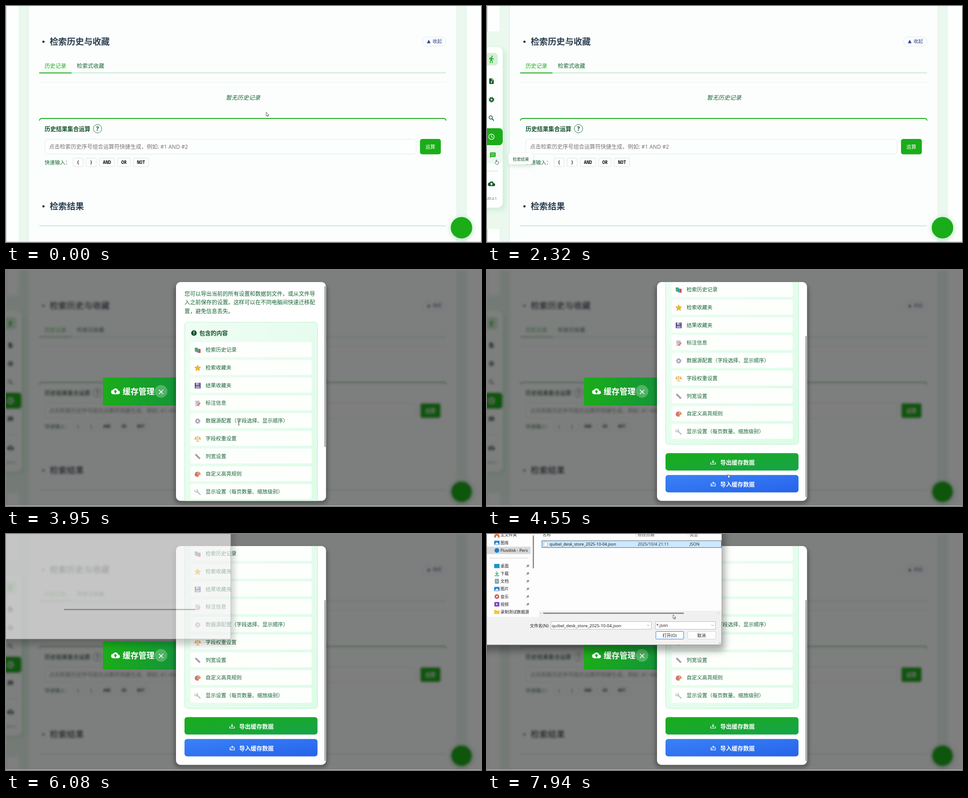
An HTML page for the animation above (8 s loop, 1059 by 529 pixels).

```html
<!DOCTYPE html>
<html lang="zh-CN">
<head>
<meta charset="utf-8">
<title>缓存管理</title>
<style>
html, body { margin: 0; width: 100%; height: 100%; overflow: hidden; background: #fff; }
svg { display: block; width: 100vw; height: 100vh; }
text { font-family: "Noto Sans", "Noto Sans CJK SC", "Noto Sans CJK", sans-serif; white-space: pre; }
.mono { font-family: "Noto Sans Mono", "DejaVu Sans Mono", monospace; }
</style>
</head>
<body>
<svg id="stage" viewBox="0 0 1059 529" preserveAspectRatio="none"></svg>
<script>
const LOOP = 8000, STEP = 120;
const GREEN = '#1aad19', DARK = '#14532d', LEAF = '#166534';

// Markup helpers; text is placed by the middle of its line
const text = (x, mid, str, size, fill, extra = '') =>
  `<text x="${x}" y="${mid + size * 0.375}" font-size="${size}" fill="${fill}" ${extra}>${str}</text>`;
const rect = (x, y, w, h, fill, rx = 0, extra = '') =>
  `<rect x="${x}" y="${y}" width="${w}" height="${h}" fill="${fill}" rx="${rx}" ${extra}/>`;
const path = (d, extra) => `<path d="${d}" ${extra}/>`;
const circle = (x, y, r, fill, extra = '') => `<circle cx="${x}" cy="${y}" r="${r}" fill="${fill}" ${extra}/>`;
const hline = (x1, x2, y, color, w = 1) => path(`M${x1} ${y}H${x2}`, `stroke="${color}" stroke-width="${w}"`);
const BOLD = 'font-weight="700"';
const MID = 'text-anchor="middle"';

// Line icons on a 24 unit grid, drawn in the current colour
const solid = d => path(d, 'fill="currentColor" fill-rule="evenodd"');
const stroked = (d, w = 2) => path(d, `fill="none" stroke="currentColor" stroke-width="${w}"`);
const ring = (x, y, r, w, extra = '') =>
  circle(x, y, r, 'none', `stroke="currentColor" stroke-width="${w}" ${extra}`);
const ICONS = {
  walk: circle(13.5, 3.5, 2, 'currentColor') +
    solid('M9.8 8.9 7 23h2.1l1.8-8 2.1 2v6h2v-7.5l-2.1-2 .6-3C14.8 12 16.8 13 19 13v-2c-1.9 0-3.5-1-4.3-2.4l-1-1.6c-.4-.6-1-1-1.7-1l-.8.1L6 8.3V13h2V9.6z'),
  file: solid('M14 2H6a2 2 0 0 0-2 2v16a2 2 0 0 0 2 2h12a2 2 0 0 0 2-2V8zM13 3.5 18.5 9H13zM12 11l4 4h-3v4h-2v-4H8z'),
  gear: ring(12, 12, 5.4, 4.2) + ring(12, 12, 8.4, 3.2, 'stroke-dasharray="3.6 3"'),
  search: ring(9.5, 9.5, 5.5, 2.2) + stroked('M13.7 13.7 20 20', 2.8),
  clock: ring(12, 12, 9, 2) + stroked('M12 6.5V12l4.5 2.8'),
  chat: solid('M4 2h16a2 2 0 0 1 2 2v12a2 2 0 0 1-2 2H6l-4 4V4a2 2 0 0 1 2-2zM6 6h3v2.5H6zM10.5 6h3v2.5h-3zM15 6h3v2.5h-3zM6 11h3v2.5H6zM10.5 11h3v2.5h-3zM15 11h3v2.5h-3z'),
  cloud: solid('M19.35 10A7.5 7.5 0 0 0 12 4C9.1 4 6.6 5.6 5.35 8A6 6 0 0 0 0 14a6 6 0 0 0 6 6h13a5 5 0 0 0 .35-10zM14 13v4h-4v-4H7l5-5 5 5z'),
  save: stroked('M3 13v7h18v-7M12 3v11M7.5 10l4.5 4.5 4.5-4.5', 2.2),
  load: stroked('M8 11H4v9h17v-9h-4M8 20v-6M9 9l4-4 4 4M13 5v9', 2.2)
};
const icon = (name, x, y, size, color, extra = '') =>
  `<g ${extra} color="${color}"><g transform="translate(${x - size / 2} ${y - size / 2}) scale(${size / 24})">${ICONS[name]}</g></g>`;

// Small coloured pictures on a 16 unit grid
const PICTURES = [
  rect(1, 2, 7, 10, '#4caf50', 1, 'transform="rotate(-6 4 7)"') + rect(6, 4, 4, 10, '#2f9fe0', 1) + rect(10, 5, 5, 10, '#e0475b', 1),
  path('M8 .8 10.2 5.6 15.4 6.2 11.5 9.7 12.6 15 8 12.3 3.4 15 4.5 9.7.6 6.2 5.8 5.6z', 'fill="#f4b721" stroke="#d99a17" stroke-width=".8"'),
  rect(1, 1, 14, 14, '#493a78', 1) + rect(4, 1, 8, 6, '#d7d4e6') + rect(3, 9, 10, 6, '#a9a2cf') + rect(8.5, 2, 2, 4, '#493a78'),
  rect(2, 1, 11, 14, '#cfd3de', 1) + hline(4, 11, 4.5, '#9299aa') + hline(4, 11, 7, '#9299aa') + path('M6 13 13 6l2 2-7 7z', 'fill="#ef6b4a"'),
  `<g color="#a8a3bb" transform="scale(.667)">${ICONS.gear}</g>`,
  path('M8 1v12M4 14h8M2 4h12M3 4 .8 9h4.6zM13 4l-2.4 5h4.6z', 'fill="#fbe3b0" stroke="#e6a64a" stroke-width="1.3"'),
  path('M1 4 4 1 15 12 12 15z', 'fill="#aaa2b8"') + path('M5 3.5 3.8 4.7M7.4 6 6.2 7.2M9.8 8.4 8.6 9.6M12 10.6 10.8 11.8', 'stroke="#716a80"'),
  path('M8 1.5c5 0 7.5 3 7 6.5-.4 2.5-3 1-4 2.5s.5 4-3 4C3.500 14.500.5 12 .7 8S4 1.500 8 1.500z', 'fill="#e58b72"') +
    circle(5, 5, 1.5, '#3e8ed0') + circle(10, 4.6, 1.5, '#f6d04d') + circle(4, 9.5, 1.5, '#b13c65') + circle(7.5, 12, 1.3, '#4caf50'),
  path('M14 14 6 6', 'stroke="#b5bdc9" stroke-width="2.6" stroke-linecap="round"') +
    path('M3 1.500v3h3', 'fill="none"') + path('M1.500 3A3.4 3.4 0 1 0 5 1.500', 'fill="none" stroke="#b5bdc9" stroke-width="2"')
];
const ROWS = ['检索历史记录', '检索收藏夹', '结果收藏夹', '标注信息', '数据源配置（字段选择、显示顺序）',
  '字段权重设置', '列宽设置', '自定义高亮规则', '显示设置（每页数量、缩放级别）'];

const defs = () => {
  const grad = (id, a, b, box = '') =>
    `<linearGradient id="${id}" x1="0" y1="0" x2="1" y2="1" ${box}><stop stop-color="${a}"/><stop offset="1" stop-color="${b}"/></linearGradient>`;
  const blur = (id, s) =>
    `<filter id="${id}" x="-50%" y="-50%" width="200%" height="200%"><feGaussianBlur stdDeviation="${s}"/></filter>`;
  return `<defs>${grad('mint', '#f0fdf4', '#dcfce7')}${grad('export', GREEN, '#16a34a')}${grad('import', '#3b82f6', '#2563eb')}
    <linearGradient id="head"><stop stop-color="${GREEN}"/><stop offset="1" stop-color="#14933b"/></linearGradient>
    ${blur('soft', 5)}${blur('wide', 8)}
    <filter id="haze" filterUnits="userSpaceOnUse" x="0" y="0" width="1059" height="529"><feGaussianBlur stdDeviation="2.6"/></filter>
    <clipPath id="sheet">${rect(379, 27, 334.5, 490.5, '#000', 10)}</clipPath>
    <clipPath id="nav">${rect(0, 0, 97, 200, '#000')}</clipPath></defs>`;
};

const page = () => {
  const title = (y, str) => circle(83.5, y, 2.6, '#2c3e50') + text(97.5, y, str, 19.1, '#2c3e50', BOLD);
  const key = (x, w, str) => rect(x + .5, 341, w, 19, '#fefefe', 3, 'stroke="#d6e2dc"') +
    text(x + .5 + w / 2, 350.4, str, 10, '#111', `${BOLD} ${MID} class="mono"`);
  return rect(0, 0, 1059, 529, '#fdfffe') +
    rect(28, 0, 22, 529, '#eaf8ef') + rect(1005, 0, 23, 529, '#eaf8ef') +
    rect(50, 0, 955, 529, '#fcfefd') + rect(49.5, 0, 1, 529, '#d5ebdd') + rect(1004.5, 0, 1, 529, '#dff0e5') +
    title(80, '检索历史与收藏') + title(449, '检索结果') +
    rect(928.5, 69.5, 52.5, 20.5, '#fbfdff', 10.2, 'stroke="#dde6ec"') +
    path('M938.500 83.500h8l-4-8z', 'fill="#2f4586"') + text(951, 79.5, '收起', 10.5, '#2f4586') +
    text(86, 134, '历史记录', 12.1, GREEN) + text(158, 134, '检索式收藏', 12.2, LEAF) +
    hline(74, 981, 150, '#b0e6c3', 1.6) + hline(74, 146, 150, GREEN, 2) + hline(74, 981, 171, '#deeee7') +
    `<g id="none">${text(490, 204.7, '暂无历史记录', 12.8, LEAF, 'font-style="italic"')}</g>` +
    path('M74.500 257Q75 252 81 252H975Q980.500 252 981 257', `fill="none" stroke="${GREEN}" stroke-width="1.8"`) +
    text(86, 275.7, '历史结果集合运算', 12.75, DARK, BOLD) +
    circle(204, 275, 9.4, '#fdfffe', `stroke="${DARK}" stroke-width=".9"`) + text(204, 275, '?', 13.5, DARK, `${BOLD} ${MID}`) +
    rect(86.5, 298.5, 828, 33.5, '#fdfefe', 6, 'stroke="#d3efe0"') +
    text(96, 315.5, '点击检索历史序号组合运算符快捷生成，例如: #1 AND #2', 12.1, '#757575') +
    rect(923, 298, 46.5, 34.5, GREEN, 5) + text(946, 315.5, '运算', 11, '#fff', MID) +
    text(86, 350.5, '快速输入：', 11.5, LEAF) +
    key(149, 22.5, '(') + key(178, 22.5, ')') + key(207.5, 34, 'AND') + key(248.5, 28, 'OR') + key(283.5, 34, 'NOT') +
    hline(74, 981, 492.7, '#a9ebc3', 1.6) +
    circle(1016, 499, 27, '#bfe3c4', 'filter="url(#soft)" opacity=".7"') + circle(1015.5, 497, 24, GREEN) +
    rect(0, 0, 1, 529, '#b4b8b6');
};

const sidebar = () => `<g id="side">` +
  rect(-20, 57, 66, 443, '#eaf8ee', 14) +
  rect(-20, 96, 62, 362, '#c9ead0', 12, 'filter="url(#soft)" opacity=".7"') +
  rect(-20, 92, 55, 360, '#fcfffd', 12) +
  rect(-10, 105, 34, 28.5, '#d3f0d6', 8) + icon('walk', 10, 119.5, 19, GREEN) +
  rect(-10, 274, 45, 38, GREEN, 8) +
  rect(-10, 316, 45, 37, '#ebf9ee', 8, 'id="hover"') +
  icon('file', 10, 168.5, 15, DARK) + icon('gear', 10, 210, 15, DARK) + icon('search', 10, 251.5, 16, DARK) +
  icon('clock', 10, 293, 16, '#fff') + icon('chat', 10, 334.5, 15, DARK, 'id="chat"') +
  icon('cloud', 10, 398.5, 16, DARK, 'id="cloud"') +
  hline(0, 25, 370, '#c3dccb') + text(.5, 431.5, '25.2.1', 7.6, LEAF) + `</g>`;

const tooltip = () => `<g id="tip">${rect(49, 334, 53, 25, '#9fc5aa', 5, 'filter="url(#soft)" opacity=".45"')}
  ${rect(48, 330, 54, 25, '#fdfffe', 5)}<text id="tipText" x="57.500" y="346.500" font-size="9" fill="${DARK}"></text></g>`;

const header = () => `<g id="header">${rect(216, 241, 180, 63, 'url(#head)', 0, 'id="headBar"')}
  ${icon('cloud', 244, 272, 19.5, '#fff')}${text(260, 272.8, '缓存管理', 17.8, '#fff', BOLD)}
  ${circle(345.5, 272, 14.3, '#fff', 'opacity=".25"')}${path('M341 268.500l9.500 9.500M350.500 268.500l-9.500 9.500', 'stroke="#fff" stroke-width="1.700"')}</g>`;

const modal = () => {
  const intro = ['您可以导出当前的所有设置和数据到文件，或从文件导', '入之前保存的设置。这样可以在不同电脑间快速迁移配', '置，避免信息丢失。'];
  const row = (str, i) => {
    const y = 161.8 + i * 39.75;
    return rect(411.5, y, 270, 33.5, '#fdfffd', 4) +
      `<g transform="translate(420 ${y + 10.5}) scale(.92)">${PICTURES[i]}</g>` + text(445, y + 17, str, 11.5, LEAF);
  };
  const button = (y, fill, name, str) => rect(398, y, 296.5, 39, fill, 6) +
    icon(name, 504, y + 20, 14, '#fff') + text(520, y + 20.3, str, 12.8, '#fff', BOLD);
  return `<g id="modal">
    ${rect(375, 32, 342, 492, '#000', 12, 'id="shade" filter="url(#soft)" opacity=".3"')}
    ${rect(379, 27, 334.5, 490.5, '#fefffe', 10, 'id="sheetBg"')}
    <g clip-path="url(#sheet)" id="body"><g id="scroll">
      ${intro.map((s, i) => text(398, 53.3 + i * 19.4, s, 12.13, LEAF)).join('')}
      ${rect(398.5, 117, 296, 409, 'url(#mint)', 6, 'stroke="#bbf0cd"')}
      ${circle(419, 141.3, 6.2, DARK)}${rect(418.3, 137.5, 1.5, 4.6, '#fff')}${rect(418.3, 143.3, 1.5, 1.5, '#fff')}
      ${text(431, 141.5, '包含的内容', 12.7, DARK, BOLD)}
      ${ROWS.map(row).join('')}
      ${button(545.5, 'url(#export)', 'save', '导出缓存数据')}
      ${button(594.5, 'url(#import)', 'load', '导入缓存数据')}
    </g>${rect(710.3, 36, 2, 361, '#7f8281', 1, 'id="thumb"')}</g></g>`;
};

const dialog = () => {
  const INK = '#1c1c1c', NAME = 'quibel_desk_store_2025-10-04.json';
  const places = [['主文件夹', 2, '#d9763f'], ['图库', 19.5, '#2886d8'], ['Fluvdisk - Pers', 36.8, '#1a7fd4'],
    ['桌面', 71.5, '#1a95c9'], ['下载', 88.5, '#22a06b'], ['文档', 105.7, '#7d94ad'], ['图片', 123, '#2886d8'],
    ['音乐', 140.2, '#d2604f'], ['视频', 157.5, '#7b3fc9'], ['录制测试数据源', 174.7, '#f5c443']];
  const glyph = (i, y, c) => {
    if (i === 0) return path(`M16 ${y + 1}l6-5 6 5v5h-4v-4h-4v4h-4z`, `fill="${c}"`);
    if (i === 2 || i === 8 - 1) return circle(22, y, 5.3, c) + (i === 7 ? circle(22, y, 2, '#fff') : '');
    if (i === 4) return path(`M22 ${y - 5}v7M18.500 ${y - 1}l3.500 3.500 3.500-3.500M17 ${y + 5}h10`, `fill="none" stroke="${c}" stroke-width="1.300"`);
    if (i === 5) return rect(17.5, y - 5, 9, 10.5, c, 1) + hline(19.5, 24.5, y - 1.5, '#fff') + hline(19.5, 24.5, y + 1.5, '#fff');
    if (i === 8) return rect(16.5, y - 5, 11, 10, c, 1) + path(`M20.500 ${y - 2.5}v5l4-2.500z`, 'fill="#fff"');
    if (i === 9) return path(`M16 ${y - 4.5}h4l1.500 1.500h6.500v7.500h-12z`, `fill="${c}"`);
    const hill = i === 3 ? '' : path(`M17 ${y + 4}l5-5 5 5z`, 'fill="#fff"');
    return rect(16, y - 4.5, 12, 9.5, c, 1) + hill;
  };
  const pin = y => path(`M87 ${y + 4}l2.700-2.700M88 ${y - 1}l4 4M89 ${y}l2.500-3 2.500 2.500-3 2.500z`, 'fill="#8a8f94" stroke="#8a8f94" stroke-width="1"');
  const field = (x, w) => rect(x + .5, 196.5, w, 17, '#fff', 0, 'stroke="#b3b3b3" stroke-width=".9"') +
    path(`M${x + w - 9} 203.500l2.500 2.500 2.500-2.500`, 'fill="none" stroke="#777" stroke-width=".9"');
  const button = (x, w, str, edge) => rect(x + .5, 218.5, w, 17, '#fdfdfd', 1, `stroke="${edge}"`) +
    text(x + w / 2, 227, str, 9.4, INK, MID);
  return `<g id="dialog">
    ${rect(-150, -100, 680, 362, '#000', 8, 'filter="url(#wide)" opacity=".33"')}
    ${rect(-150, -150, 673, 398.5, '#f1f1f1', 4, 'stroke="#7e8b96" stroke-width=".8"')}
    <g id="inside">
      ${rect(0, 0, 523, 186, '#fdfdfd')}${rect(116, 172, 407, 24, '#f0f0f0')}
      ${rect(0, 28.5, 97, 16.5, '#d9d9d9')}
      <g clip-path="url(#nav)">${places.map(([s, y, c], i) => glyph(i, y, c) + text(30, y, s, 9.15, INK) + (i > 2 && i < 9 ? pin(y) : '')).join('')}</g>
      ${hline(5, 92, 54, '#cfcfcf')}${rect(102, 3, 2.6, 74, '#868686', 1.3)}
      ${text(124, 1.5, '名称', 9.3, '#555')}${text(336, 1.5, '修改日期', 9.3, '#555')}${text(452, 1.5, '类型', 9.3, '#555')}
      ${rect(331.5, 0, 1, 7, '#ddd')}${rect(447.5, 0, 1, 7, '#ddd')}
      ${rect(122.5, 15, 400, 15.3, '#cce8ff', 0, 'id="pick" stroke="#35506a" stroke-width=".9"')}
      ${path('M127 17.500h5l2.500 2.500v8h-7.500z', 'fill="#fff" stroke="#9aa3ab" stroke-width=".8"')}
      ${text(139.5, 23, NAME, 9.1, INK)}${text(336, 23, '2025/10/4 21:11', 9.2, '#333')}${text(452, 23, 'JSON', 9.2, '#333')}
      ${path('M121 175.500l-2 2 2 2M515 175.500l2 2-2 2', 'fill="none" stroke="#bbb"')}
      ${text(139, 205, '文件名(N):', 9.4, INK, 'text-anchor="end"')}
      ${field(142, 224)}<g id="chosen">${text(144.5, 205, NAME, 9.5, INK)}</g>
      ${field(375, 134)}${text(377.5, 205, '*.json', 9.3, INK)}
      ${button(376, 62, '打开(O)', '#2a84d2')}${button(447, 62.5, '取消', '#d2d2d2')}
      ${path('M516 246.500l5-5M519 246.500l2-2', 'stroke="#9aa"')}
    </g>${rect(125, 176.3, 314, 2.6, '#868686', 1.3)}</g>`;
};

const POINTERS = {
  arrow: path('M0 0v8.800l2-1.900 1.400 3 1.500-.7-1.400-2.900h2.700z', 'fill="#fff" stroke="#333" stroke-width=".8"'),
  hand: path('M-.8 5V.3Q0-.7.8.300V3.500l3.700.8V7.500L3.500 10H-.8L-3.200 6.300l.8-.8z', 'fill="#fff" stroke="#333" stroke-width=".8"'),
  beam: path('M-1.800-.5H-.5L0 0 .5-.5H1.800M0 0V8M-1.800 8.500H-.5L0 8 .5 8.500H1.800', 'fill="none" stroke="#333" stroke-width=".9"')
};

const stage = document.getElementById('stage');
stage.innerHTML = defs() + `<g id="page">${page()}${sidebar()}${tooltip()}</g>` +
  rect(0, 0, 1059, 528, '#000', 0, 'id="veil"') + header() + modal() + dialog() +
  `<g id="pointer">${Object.entries(POINTERS).map(([k, v]) => `<g id="${k}">${v}</g>`).join('')}</g>` +
  rect(0, 528, 1059, 1, '#b0b5b2', 0, 'opacity=".8"');

const $ = {};
stage.querySelectorAll('[id]').forEach(e => $[e.id] = e);
const set = (id, name, value) => $[id].setAttribute(name, value);
const show = (id, on) => set(id, 'display', on ? 'inline' : 'none');

// The picture changes in short bursts of equal steps: [start, count]
const BURSTS = [[0, 1], [520, 7], [1360, 7], [2200, 2], [2570, 4], [3200, 4], [3830, 7], [4670, 2],
  [4930, 1], [5180, 3], [6080, 4], [6690, 6], [7430, 2], [7700, 3]];
const TICKS = BURSTS.flatMap(([start, n]) => Array.from({ length: n }, (_, i) => start + i * STEP));
const snap = t => TICKS.filter(k => k <= t).pop();

// Linear track through [time, value] points
const track = (keys, t, col = 1) => {
  const i = keys.findIndex(k => k[0] > t);
  if (i < 0) return keys[keys.length - 1][col];
  if (i === 0) return keys[0][col];
  const a = keys[i - 1], b = keys[i];
  return a[col] + (b[col] - a[col]) * (t - a[0]) / (b[0] - a[0]);
};
const PATH = [[400, 580, 238], [1240, 50, 290], [1480, 24, 292], [1840, 22, 296], [2080, 21, 328], [2320, 21, 345],
  [2450, 21, 345], [2930, 18, 402], [3710, 18, 402], [3950, 519, 339], [4190, 519, 339], [4550, 537, 458],
  [4790, 535, 474], [4930, 535, 476], [6570, 532, 474], [7170, 215, 30], [7290, 205, 25], [7550, 200, 23],
  [7700, 210, 28], [7940, 415, 181]];
const SIDE = [[1240, -70], [1720, 0], [6570, 0], [7050, -70]];
const SCROLL = [[3950, 0], [4070, 20], [4190, 62], [4310, 105], [4430, 135]];
const OPEN = [[3080, 0], [3200, .3], [3320, .65], [3440, .9], [3560, 1]];
const POP = [[5960, 0], [6080, .62], [6200, .9], [6320, 1]];

function hoverState(t) {
  const tip = t >= 1600 && t < 2080 ? ['检索历史', 293] : t >= 2080 && t < 2690 ? ['检索结果', 334]
    : t >= 2690 && t < 3440 ? ['缓存管理', 397] : null;
  const chat = t >= 2080 && t < 2690, cloud = t >= 2690 && t < 3200;
  show('tip', tip);
  if (tip) {
    $.tipText.textContent = tip[0];
    set('tip', 'transform', `translate(0 ${tip[1] - 334})`);
    set('tip', 'opacity', t >= 3320 ? .25 : t >= 3200 ? .6 : 1);
  }
  show('hover', chat || cloud);
  set('hover', 'y', chat ? 316 : 380);
  for (const [id, on] of [['chat', chat], ['cloud', cloud]]) {
    set(id, 'color', on ? GREEN : DARK);
    set(id, 'transform', `translate(${on ? 3 : 0} 0)`);
  }
}

function draw(t) {
  const open = track(OPEN, t), scroll = track(SCROLL, t), pop = track(POP, t), side = track(SIDE, t);
  const hazy = t >= 3440;

  set('side', 'transform', `translate(${side} 0)`);
  show('side', side > -70);
  hoverState(t);
  hazy ? set('page', 'filter', 'url(#haze)') : $.page.removeAttribute('filter');
  show('none', !hazy);

  set('veil', 'opacity', open < .7 ? open * .43 : open * .5);
  show('header', open);
  show('modal', open);
  set('headBar', 'opacity', open < 1 ? open * .9 : 1);
  const slide = -62 * (1 - open);
  set('headBar', 'width', 180 + slide);
  set('modal', 'transform', `translate(${slide} 0)`);
  set('sheetBg', 'opacity', Math.min(1, .3 + open * .85));
  set('shade', 'opacity', open * .3);
  set('body', 'opacity', open);
  set('scroll', 'transform', `translate(0 ${-scroll})`);
  set('thumb', 'y', 36 + scroll * 112 / 135);

  show('dialog', pop);
  const zoom = 1 - .171 * (1 - pop);
  set('dialog', 'opacity', pop);
  set('dialog', 'transform', `translate(185 48) scale(${zoom}) translate(-185 -48)`);
  show('inside', pop > .7);
  show('pick', t >= 7170);
  set('pick', 'fill', t >= 7700 ? '#cce8ff' : '#e5f3ff');
  set('pick', 'stroke', t >= 7700 ? '#35506a' : 'none');
  show('chosen', t >= 7700);

  const kind = (t >= 1480 && t < 2930) || (t >= 4670 && t < 6080) ? 'hand' : t >= 3950 && t < 4310 ? 'beam' : 'arrow';
  for (const k in POINTERS) show(k, k === kind);
  set('pointer', 'transform', `translate(${track(PATH, t, 1)} ${track(PATH, t, 2)})`);
  show('pointer', t < 5420 || t >= 6690);
}

const begin = performance.now();
let last = -1;
function frame() {
  const t = snap((performance.now() - begin) % LOOP);
  if (t !== last) draw(last = t);
  requestAnimationFrame(frame);
}
frame();
</script>
</body>
</html>
```
